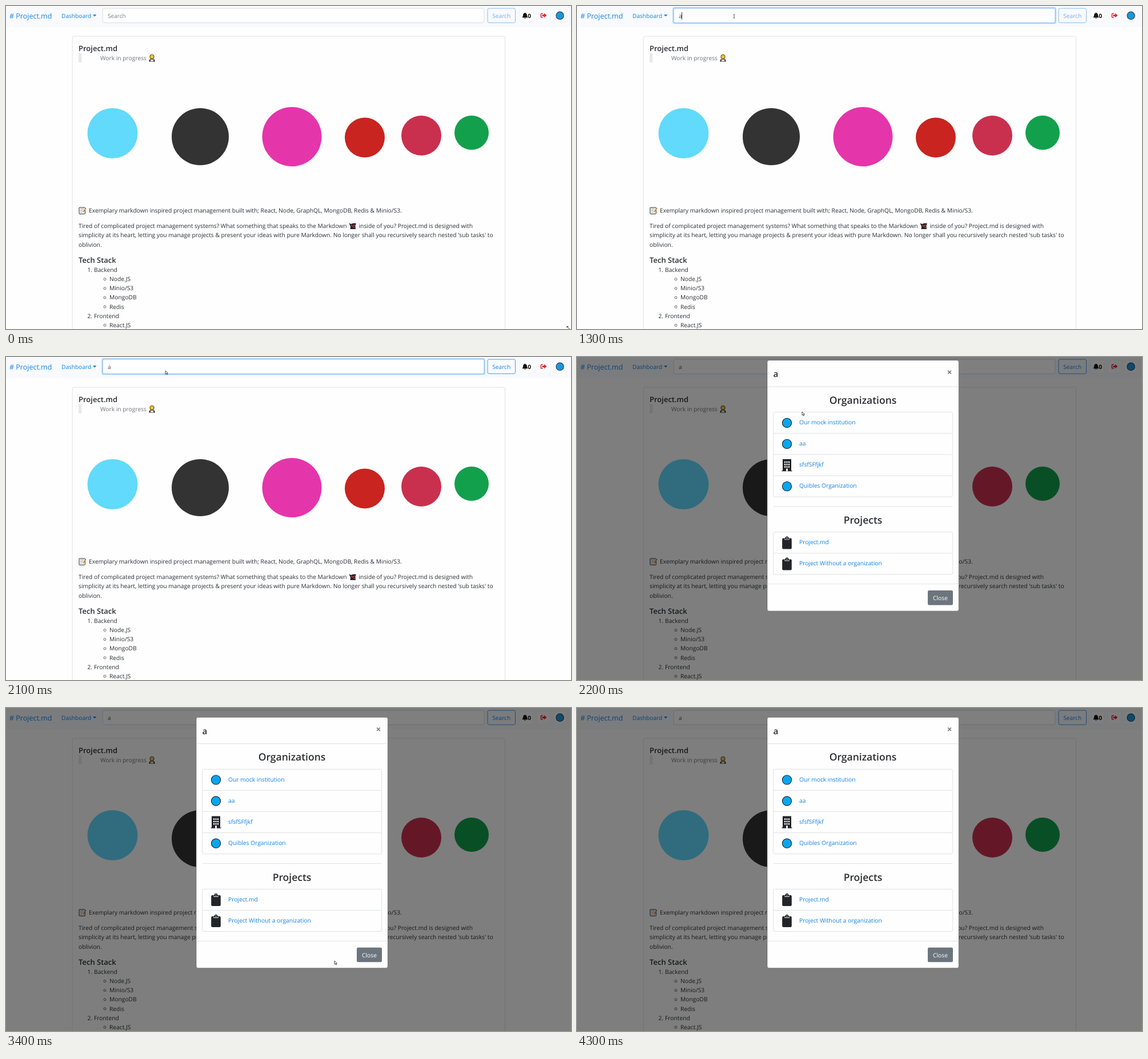
Write an HTML page that moves like this. It is 989x566 px and loops after 4.4 s.

```html
<!DOCTYPE html>
<html lang="en">
<head>
<meta charset="utf-8">
<title>Project.md</title>
<style>
  html, body { margin: 0; width: 100%; height: 100%; overflow: hidden; background: #fefefe; }
  svg { display: block; width: 989px; height: 566px; }
  text {
    font: 10.27px "Open Sans", "Noto Sans", sans-serif;
    fill: #2b2f33;
    text-rendering: geometricPrecision;
    white-space: pre;
  }
  .head { font-size: 13px; font-weight: 600; }
  .title { font-size: 17.5px; font-weight: 600; text-anchor: middle; }
  .brand { font-size: 12.5px; }
  .nav { font-size: 10.15px; }
  .link { fill: #1583e9; }
  .mid { text-anchor: middle; }
  .line { fill: none; stroke: #dfe1e4; }
</style>
</head>
<body>
<svg id="stage" viewBox="0 0 989 566" xmlns="http://www.w3.org/2000/svg"></svg>
<script>
const LOOP = 4400;
const stage = document.getElementById('stage');

const text = (x, y, s, cls = '', extra = '') =>
  `<text x="${x}" y="${y}" class="${cls}" ${extra}>${s.replace(/&/g, '&amp;')}</text>`;
const rect = (x, y, w, h, r, attrs) =>
  `<rect x="${x}" y="${y}" width="${w}" height="${h}" rx="${r}" ${attrs}/>`;
const circle = (x, y, r, fill, extra = '') =>
  `<circle cx="${x}" cy="${y}" r="${r}" fill="${fill}" ${extra}/>`;
const path = (d, attrs) => `<path d="${d}" ${attrs}/>`;
const at = (x, y, body, id = '') => `<g ${id && `id="${id}"`} transform="translate(${x} ${y})">${body}</g>`;
const rule = (x1, x2, y) => path(`M${x1} ${y}H${x2}`, 'class="line"');

// Small icons
const worker =
  path('M-5.2 6.2Q-5.2 1 0 1T5.2 6.2Z', 'fill="#2b2927"') +
  circle(0, -2.4, 3.7, '#f3c32f', 'stroke="#3b3220" stroke-width=".9"') +
  rect(-2.8, 2.2, 5.6, 3.6, .6, 'fill="#d9d2c8"');
const memo =
  rect(-6, -5.5, 10.4, 11.4, .8, 'fill="#f5f5f3" stroke="#2f2f31" stroke-width="1"') +
  path('M-4 -2.8H2M-4 0H0M-4 2.8H-1', 'stroke="#8a8a8a" stroke-width=".8"') +
  path('M6 -4.2L.8 2.8', 'stroke="#d98a35" stroke-width="1.9"');
const imp =
  path('M-6.5 -5L-3 -3.5Q1 -6 6 -4.5L4.5 -1L5 5.5H-4.5L-4 1Z', 'fill="#27272b"') +
  path('M-3 -1.5L0 .2L3.4 -2M1.5 2.5H4', 'stroke="#d6343f" stroke-width="1.5" fill="none"');
const bell =
  path('M-5 3.4Q-3.4 2 -3.4 -.8Q-3.2 -3.8 -.7 -4.2V-5H.7V-4.2Q3.2 -3.8 3.4 -.8Q3.4 2 5 3.4Z', 'fill="#111"') +
  path('M-1.4 4H1.4Q1 5.3 0 5.3T-1.4 4Z', 'fill="#111"');
const exit =
  path('M-1.4 -3.4H-3.6Q-4.6 -3.4 -4.6 -2.4V2.4Q-4.6 3.4 -3.6 3.4H-1.4', 'fill="none" stroke="#e8202f" stroke-width="1.5"') +
  path('M-2.6 -1.4H.8V-4L5.4 0L.8 4V1.4H-2.6Z', 'fill="#e8202f"');
const disc = circle(0, 0, 8.1, '#07a7ee', 'stroke="#20262c" stroke-width="1.1"');
const windows = [-6.6, -2.4, 1.8].map(y =>
  [-4.6, -1.1, 2.4].map(x => rect(x, y, 2.2, 2.5, 0, 'fill="#fff"')).join('')).join('');
const building =
  path('M-7.5 -10.5H7.5V9.5H9V10.7H-9V9.5H-7.5Z', 'fill="#212529"') + windows +
  rect(-1.4, 6, 2.8, 4.7, 0, 'fill="#fff"');
const clipboard =
  rect(-8.3, -8, 16.6, 19, 2, 'fill="#212529"') +
  circle(0, -8, 3, '#212529') +
  rect(-4.2, -7.5, 8.4, 2.4, .8, 'fill="#fff"') +
  rect(-3.6, -8, 7.2, 2, .6, 'fill="#212529"') +
  circle(0, -8.4, .9, '#fff');

const pill = x => rect(x, 5.3, 23.5, 22.7, 3, 'fill="#fdfdfe" stroke="#f0f1f4" stroke-width=".7"');

const navbar = () =>
  rect(0, 0, 989, 36.5, 0, 'fill="#f8fafd"') +
  text(6, 21.5, '# Project.md', 'brand link') +
  text(97, 20.8, 'Dashboard', 'nav link') +
  path('M152 15H158.4L155.2 18.6Z', 'fill="#1583e9"') +
  rect(167.3, 2.1, 671.6, 29.2, 4, 'id="ring" fill="#a9d3fc"') +
  rect(169.3, 4.1, 667.6, 25.2, 2.6, 'id="field" fill="#fff" stroke-width=".8"') +
  text(178, 20.8, '', 'nav', 'id="query"') +
  path('M183.6 11V23.5', 'id="caret" stroke="#222" stroke-width="1"') +
  `<g id="button">${rect(843, 4.1, 48.5, 25.2, 2.8, 'fill="none" stroke="#1583e9" stroke-width=".8"')}` +
  text(867.2, 20.8, 'Search', 'nav link mid') + '</g>' +
  pill(899.5) + pill(929) + pill(958) +
  at(908.5, 16.8, bell) +
  text(913.3, 20.6, '0', '', 'style="font-weight:700;fill:#111"') +
  at(941, 16.6, exit) +
  circle(969.6, 16.8, 6.7, '#1a97dc', 'stroke="#2d4050" stroke-width="1.1"');

const stack = [
  [1, 'Backend', ['Node.JS', 'Minio/S3', 'MongoDB', 'Redis']],
  [2, 'Frontend', ['React.JS']]
];

function list() {
  let y = 466, out = '';
  for (const [n, name, items] of stack) {
    out += text(142.5, y, n + '.') + text(154, y, name);
    for (const item of items) {
      y += 16.15;
      out += circle(173, y - 3.5, 2, 'none', 'stroke="#444" stroke-width=".8"') + text(181, y, item);
    }
    y += 16.15;
  }
  return out;
}

const page = () =>
  rect(116.2, 53, 757.3, 530, 3, 'fill="#fefefe" stroke="#e1e2e4"') +
  text(127, 78.6, 'Project.md', 'head') +
  rect(127, 83, 5.5, 16, 0, 'fill="#e9e9e9"') +
  text(165, 95, 'Work in progress', '', 'style="fill:#70757a"') + at(255.5, 91.3, worker) +
  circle(186.5, 223, 44, '#61dafb') +
  circle(340, 229, 50, '#333333') +
  circle(500.5, 229, 52, '#e535ab') +
  circle(628, 230.5, 35, '#c9241f') +
  circle(727, 227, 35, '#c9304e') +
  circle(815, 222, 30, '#13a04c') +
  at(134, 358.5, memo) +
  text(145, 362, 'Exemplary markdown inspired project management built with; React, Node, GraphQL, MongoDB, Redis & Minio/S3.') +
  text(127, 389, 'Tired of complicated project management systems? What something that speaks to the Markdown') +
  at(607, 385.6, imp) +
  text(617.5, 389, 'inside of you? Project.md is designed with') +
  text(127, 405.3, "simplicity at its heart, letting you manage projects & present your ideas with pure Markdown. No longer shall you recursively search nested 'sub tasks' to") +
  text(127, 421.5, 'oblivion.') +
  text(127, 450, 'Tech Stack', 'head') + list();

const ROW = 37.1;
const group = (y, rows) =>
  rect(343.7, y, 314, rows.length * ROW, 3, 'class="line"') +
  rows.map(([icon, name], i) =>
    (i ? rule(344, 657.5, y + i * ROW) : '') +
    at(367.5, y + i * ROW + 18.6, icon) +
    text(389, y + i * ROW + 21.2, name, 'link')).join('');

const modal = () =>
  rect(333, 16.3, 335.3, 439.5, 3.2, 'fill="#fefefe" stroke="#5c5c5c" stroke-width=".6"') +
  text(343.5, 45.8, 'a', '', 'style="font-size:15.2px;font-weight:600"') +
  path('M649.2 34.5L654.8 40.1M654.8 34.5L649.2 40.1', 'stroke="#777" stroke-width="1.6"') +
  rule(333.3, 668, 62.6) +
  text(500.5, 92.3, 'Organizations', 'title') +
  group(107.3, [
    [disc, 'Our mock institution'], [disc, 'aa'],
    [building, 'sfsfSFfjkf'], [disc, 'Quibles Organization']
  ]) +
  rule(343.7, 657.7, 272.6) +
  text(500.5, 302.5, 'Projects', 'title') +
  group(317.4, [[clipboard, 'Project.md'], [clipboard, 'Project Without a organization']]) +
  rule(333.3, 668, 408.3) +
  rect(614, 419.7, 44, 25.6, 2.6, 'fill="#6c757d"') +
  text(636, 436.8, 'Close', 'mid', 'style="fill:#fff"');

const cursors =
  path('M0 0L4.4 4.2L2.7 4.4L3.7 6.5L2.6 7L1.6 4.8L0 6.1Z', 'id="arrow" fill="#fff" stroke="#222" stroke-width=".8"') +
  path('M-1.5 -3H1.5M0 -3V3M-1.5 3H1.5', 'id="beam" fill="none" stroke="#555" stroke-width=".9"') +
  path('M-2 -2L2.5 2.5M-2 .4V-2H.4', 'id="corner" fill="none" stroke="#333" stroke-width="1"');

stage.innerHTML = rect(0, 0, 989, 566, 0, 'fill="#fefefe"') + page() + navbar() +
  `<g id="overlay">${rect(0, 0, 989, 566, 0, 'fill="#000" opacity=".5"')}${at(0, 0, modal(), 'dialog')}</g>` +
  at(0, 0, cursors, 'pointer');

const el = {};
stage.querySelectorAll('[id]').forEach(n => el[n.id] = n);
const show = (node, on) => node.setAttribute('display', on ? 'inline' : 'none');
const move = (node, x, y) => node.setAttribute('transform', `translate(${x} ${y})`);

// Pointer path: time, x, y
const track = [
  [0, 984, 563.5], [100, 760, 400], [300, 480, 180], [400, 305, 39], [600, 290, 28],
  [700, 275, 18], [1800, 275, 18], [2000, 279, 24], [2100, 279, 24], [2200, 394, 96],
  [2700, 398, 96], [2900, 575, 443], [3400, 575, 443], [3500, 572, 457]
];

function pointerAt(t) {
  const i = track.findIndex(k => k[0] > t);
  if (i < 0) return track[track.length - 1].slice(1);
  const [t0, x0, y0] = track[i - 1], [t1, x1, y1] = track[i];
  const f = (t - t0) / (t1 - t0);
  return [x0 + (x1 - x0) * f, y0 + (y1 - y0) * f];
}

// Pictures are held in a 700 ms rhythm
const HOLD = [0, 100, 100, 300, 400, 400, 600];
const held = t => t - t % 700 + HOLD[Math.floor(t % 700 / 100)];

function draw(time) {
  const t = held(time);
  const open = t >= 2200, typed = t >= 1300, focus = t >= 1000 && !open;

  show(el.ring, focus);
  el.field.setAttribute('stroke', focus ? '#80bdff' : '#ced4da');
  el.query.textContent = typed ? 'a' : 'Search';
  el.query.style.fill = typed ? '#495057' : '#7a8087';
  show(el.caret, focus && t < 1800);
  move(el.caret, typed ? 0 : -5.6, 0);
  el.button.setAttribute('opacity', t >= 1400 ? 1 : .62);

  show(el.overlay, open);
  move(el.dialog, 0, t < 2400 ? -10.6 : 0);

  const beam = t >= 600 && t < 2000;
  show(el.corner, t < 100);
  show(el.beam, beam);
  show(el.arrow, t >= 100 && !beam && t < 3600);
  move(el.pointer, ...pointerAt(t));
}

const start = performance.now();
function tick() {
  draw((performance.now() - start) % LOOP);
  requestAnimationFrame(tick);
}
tick();
</script>
</body>
</html>
```
